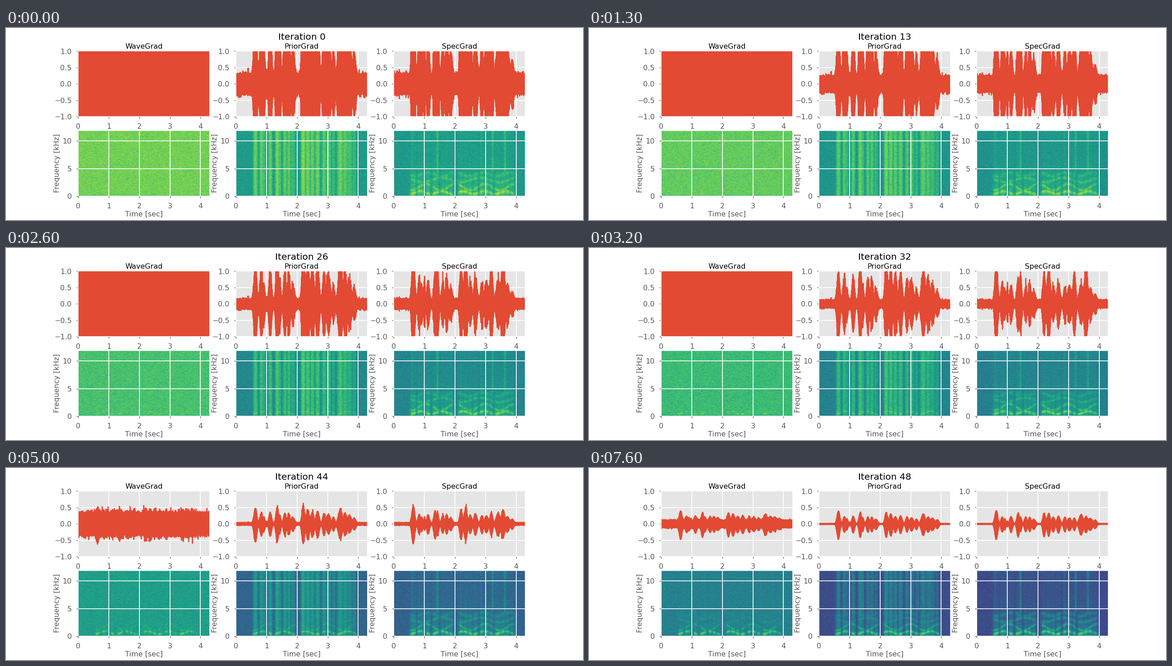
Write a matplotlib script that moves like this. It is 1280 px wide and 427 px high and loops after 8000 ms.

```python
import numpy as np
import matplotlib.pyplot as plt
from matplotlib.animation import FuncAnimation

W, H, DPI = 1280, 427, 100
PX = 72 / DPI                      # points per pixel
DURATION, FMAX = 4.3, 11.84        # seconds, kHz
LEFTS, AX_W = (160.2, 510.2, 860.4), 291.6
TOPS, AX_H = (51.5, 228.5), 145.5
RED, GRAY = "#E24A33", "#555555"
METHODS = ("WaveGrad", "PriorGrad", "SpecGrad")

# Steps come every 100 ms, then slow down towards the end.
STARTS = list(range(42)) + [43, 46, 50, 55, 61, 68, 76]
N_FRAMES = 80

plt.rcParams.update({"font.family": "DejaVu Sans", "font.size": 16 * PX})
rng = np.random.default_rng(7)

# Syllables: time, width, speech level, noise gain (PriorGrad), noise gain (SpecGrad)
SYLLABLES = np.array([
    (0.635, .065, .42, .90, 1.15), (0.83, .06, .22, .80, .58),
    (0.91, .05, .17, .45, .42), (1.00, .03, .06, .12, .55),
    (1.12, .06, .24, .80, .52), (1.35, .06, .36, 1.15, .72),
    (1.43, .05, .20, .55, .85), (1.60, .06, .22, .76, .45),
    (1.73, .06, .21, .72, .60), (1.86, .08, .15, .40, .35),
    (2.20, .06, .35, 1.40, .88), (2.35, .07, .32, 1.00, 1.08),
    (2.50, .07, .22, .85, .45), (2.67, .07, .25, .92, .60),
    (2.88, .06, .22, .76, .45), (3.03, .08, .19, .65, .52),
    (3.19, .06, .16, .38, .95), (3.41, .085, .31, .95, .50),
    (3.57, .08, .22, .70, 1.00), (3.71, .10, .18, .50, .40),
    (3.87, .07, .13, .35, .25),
])

# Fricatives: time, width, lowest kHz, strength
FRICATIVES = [(0.60, .05, 3.8, .22), (0.97, .02, 5.0, .32), (1.43, .04, 3.5, .50),
              (2.86, .025, 2.0, .28), (3.24, .04, 4.0, .46), (3.64, .045, 3.0, .46)]

FLOOR = 0.115                      # noise gain in silence
FULL = 2.87                        # noise level at the first step
SLOPE = 0.11                       # colour change per e-fold of level


def envelope(t, column):
    c, w, h = SYLLABLES[:, 0], SYLLABLES[:, 1], SYLLABLES[:, column]
    return (h * np.exp(-((t[:, None] - c) / w) ** 2)).max(axis=1)


def noise_level(step):
    """Peak amplitude of the remaining white noise."""
    knots = [0, 13, 21, 32, 40, 46, 48]
    levels = [FULL, 2.26, 1.74, 1.10, 0.65, 0.27, 0.12]
    return np.exp(np.interp(step, knots, np.log(levels)))


def signal_gain(level):
    return np.sqrt(max(1 - (level / FULL) ** 2, 1e-4))


# Waveforms
N = 1160
wave_t = np.linspace(0, 4.275, N)
wave_x = np.append(wave_t, [4.28, 4.295])
sign = np.where(np.arange(N) % 2, -1, 1)
speech = envelope(wave_t, 2) * np.where(sign > 0, 0.95, 1.15)
speech *= rng.uniform(0.88, 1.0, N)
gains = [np.ones(N),
         np.hypot(FLOOR, envelope(wave_t, 3)),
         np.hypot(FLOOR, envelope(wave_t, 4))]
jitter = 0.88 + 0.09 * rng.exponential(1, (3, N))


def waveform(k, step):
    level = noise_level(step)
    amp = np.hypot(speech * signal_gain(level), gains[k] * jitter[k] * level)
    return np.append(np.clip(sign * amp, -1.05, 1.05), [0, 0])


# Spectrograms
ROWS, COLS = 146, 292
spec_t = np.linspace(0, DURATION, COLS)
freq = np.linspace(0, FMAX, ROWS)[:, None]
voice = np.sqrt(np.clip(envelope(spec_t, 2) / 0.2, 0, 1))


def band(center, width):
    return np.exp(-((freq - center) / width) ** 2)


def speech_map():
    """Relative brightness of speech over frequency and time, 0 to 1."""
    t = spec_t
    layers = [band(0.6 + 0.25 * np.sin(9 * t), 0.40),
              0.78 * band(1.6 + 0.6 * np.sin(6.5 * t + 1), 0.38),
              0.58 * band(2.9 + 0.4 * np.sin(5 * t), 0.42),
              0.46 * band(3.9 + 0.3 * np.sin(7 * t), 0.50),
              0.50 * np.exp(-freq / 4) + 0 * t,
              0.08 + 0 * freq]
    out = voice * np.max(np.broadcast_arrays(*layers), axis=0)
    for c, w, low, h in FRICATIVES:
        rise = 1 / (1 + np.exp(-(freq - low) / 0.4))
        ripple = 0.85 + 0.15 * np.cos(1.1 * (freq - 5.5))
        out = np.maximum(out, h * rise * ripple * np.exp(-((t - c) / w) ** 2))
    return out


def noise_field():
    """Complex noise, smoothed along time into short streaks."""
    z = rng.normal(size=(2, ROWS, COLS + 4))
    z = sum(k * z[..., i:i + COLS] for i, k in enumerate((.35, .8, 1, .8, .35)))
    return (z[0] + 1j * z[1]) / np.sqrt(5)


shape = speech_map()
pitch = 0.25 + 0.03 * np.sin(4 * spec_t)
voiced = (0.2 + 0.52 * shape + voice * np.exp(-freq / 0.6) * 0.1
          + 0.05 * voice * np.exp(-freq / 3) * np.cos(2 * np.pi * freq / pitch))
base = [0.80,
        0.80 + SLOPE * np.log(np.hypot(FLOOR, envelope(spec_t, 3))),
        0.55 + 0.33 * shape]
fields = [(noise_field(), noise_field()) for _ in METHODS]
bottom_dip = 0.08 * (freq < 0.1)


def spectrogram(k, step):
    level = noise_level(step)
    a, b = fields[k]
    z = a * np.cos(0.15 * step) + b * np.sin(0.15 * step)
    grain = 0.05 * np.clip(np.log(np.abs(z) + 1e-9), -2.2, 1)
    noise = base[k] + SLOPE * np.log(level / FULL) + grain
    clean = voiced + SLOPE * np.log(signal_gain(level)) + 0.4 * grain
    s = SLOPE / 2
    return s * np.logaddexp(noise / s, clean / s) - bottom_dip


# Layout; the small margin keeps the pixel size from rounding down.
fig = plt.figure(figsize=((W + 0.01) / DPI, (H + 0.01) / DPI), dpi=DPI,
                 facecolor="white")


def text(x, y, s, size=16, **kw):
    return fig.text(x / W, 1 - y / H, s, fontsize=size * PX, ha="center",
                    va="baseline", rotation_mode="anchor", **kw)


def add_axes(left, top):
    ax = fig.add_axes([left / W, 1 - (top + AX_H) / H, AX_W / W, AX_H / H],
                      facecolor="#E5E5E5")
    ax.grid(color="white", lw=1.7 * PX, ls="-")
    ax.spines[:].set(color="white", linewidth=1.6 * PX)
    ax.tick_params(color=GRAY, labelcolor=GRAY, length=4 * PX, width=1.3 * PX)
    ax.tick_params(axis="x", pad=11 * PX)
    ax.tick_params(axis="y", pad=10.5 * PX)
    return ax


lines, images = [], []
for k, (left, name) in enumerate(zip(LEFTS, METHODS)):
    mid = left + AX_W / 2
    top = add_axes(left, TOPS[0])
    top.set_axisbelow(True)
    line, = top.plot(wave_x, waveform(k, 0), color=RED, lw=2.4 * PX,
                     solid_joinstyle="round")
    top.set(xlim=(0, DURATION), ylim=(-1, 1), xticks=range(5),
            yticks=[-1, -0.5, 0, 0.5, 1])
    text(mid, 46, name, color="black")

    low = add_axes(left, TOPS[1])
    low.set_axisbelow(False)
    image = low.imshow(spectrogram(k, 0), origin="lower", aspect="auto",
                       extent=(0, DURATION, 0, FMAX), cmap="viridis",
                       vmin=0, vmax=1, interpolation="bilinear")
    low.set(xlim=(0, DURATION), ylim=(0, FMAX), xticks=range(5),
            yticks=[0, 5, 10])
    text(mid, 419, "Time [sec]", color=GRAY)
    text(left - 42.5, 300.5, "Frequency [kHz]", color=GRAY, rotation=90)
    lines.append(line)
    images.append(image)

heading = text(656, 26, "Iteration 0", size=20.1, color="black")


def update(frame):
    step = int(np.searchsorted(STARTS, frame, side="right")) - 1
    heading.set_text(f"Iteration {step}")
    for k in range(3):
        lines[k].set_ydata(waveform(k, step))
        images[k].set_data(spectrogram(k, step))
    return [heading, *lines, *images]


anim = FuncAnimation(fig, update, frames=N_FRAMES, interval=100,
                     repeat=True, repeat_delay=0, blit=False)
plt.show()
```
